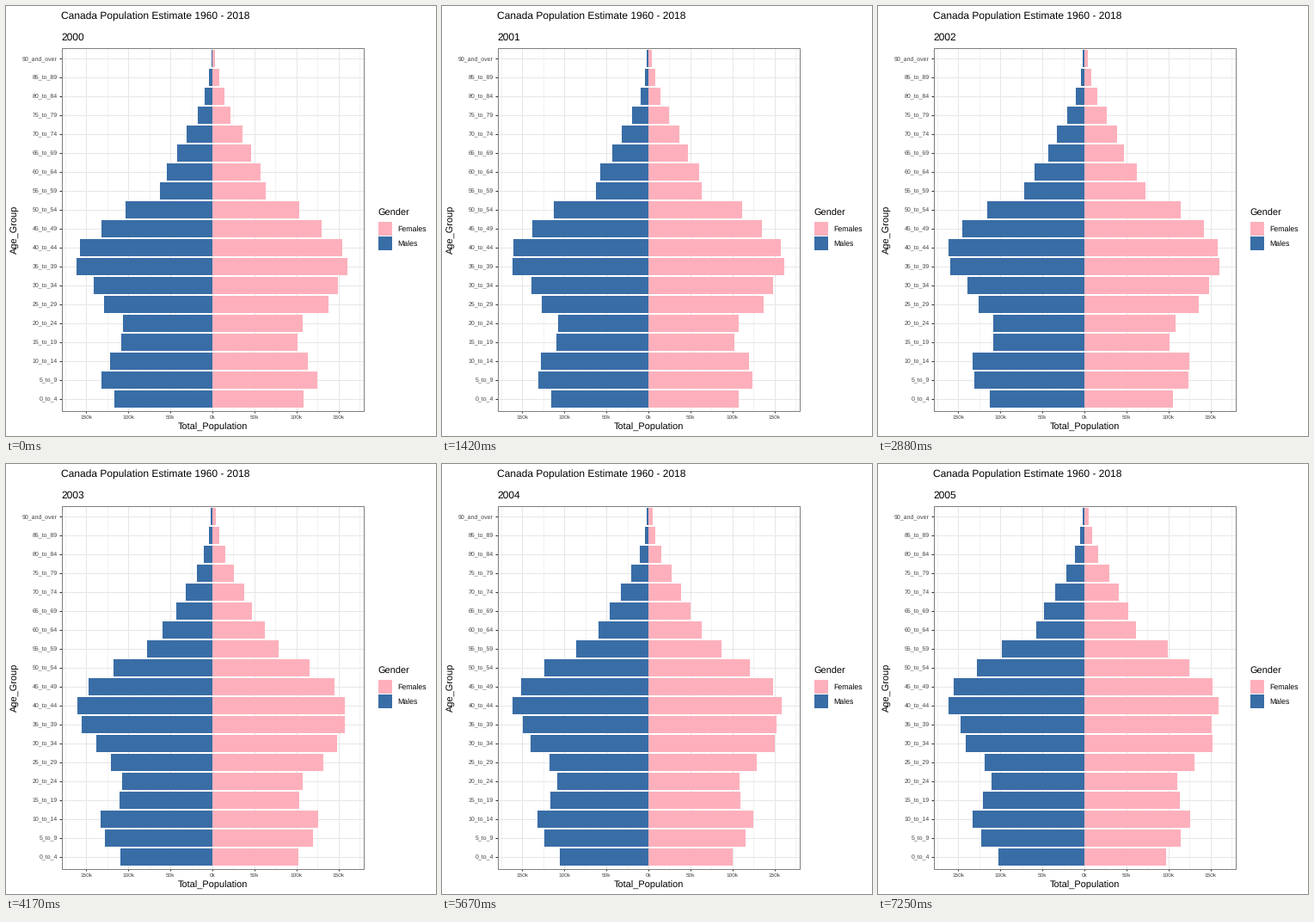
Animation of 500x500 px, one loop 8 s. Source, as a matplotlib script:

```python
import numpy as np
import matplotlib.pyplot as plt
from matplotlib.animation import FuncAnimation

SIZE = 500
LOOP_MS, STEP_MS = 8000, 20
FIRST_YEAR = 2000
FIRST_ARRIVAL, PERIOD, MOVE_MS = 1420, 1457.5, 470

PINK, BLUE = "#FDB0BC", "#396DA6"
GRID, DARK, BORDER, TICK_TEXT = "#E7E7E7", "#333333", "#7F7F7F", "#404040"
LEFT, RIGHT, TOP, BOTTOM = 64.5, 415.5, 48.5, 470.5
ZERO, PX_PER_K = 240, 0.9767
FIRST_ROW, PITCH, BAR_HEIGHT = 457.2, 22, 20

# Age group: male bar lengths by year, in pixels
MALES = {
    "0_to_4": (114, 113, 110, 106, 103, 100),
    "5_to_9": (129, 128, 128, 124, 121, 120),
    "10_to_14": (119, 125, 130, 130, 129, 130),
    "15_to_19": (106, 107, 106, 108.6, 115, 118),
    "20_to_24": (104, 105, 106, 105, 106, 108),
    "25_to_29": (126, 124, 123, 117, 115, 116),
    "30_to_34": (138, 136, 136, 135.3, 137, 138),
    "35_to_39": (158, 158, 156, 151.3, 146, 144),
    "40_to_44": (154, 157, 158, 157, 158, 158),
    "45_to_49": (129, 135, 142, 145, 148, 152),
    "50_to_54": (101, 110, 113, 115.6, 121, 125),
    "55_to_59": (61, 61, 70, 77.4, 85, 96),
    "60_to_64": (53, 56, 58, 58, 58, 56),
    "65_to_69": (41, 42, 42, 42, 45, 47),
    "70_to_74": (30, 31, 32, 31, 32, 34),
    "75_to_79": (17, 19, 20, 17.8, 20, 21),
    "80_to_84": (9, 9, 10, 10, 10, 11),
    "85_to_89": (4, 4, 4, 4, 4, 5),
    "90_and_over": (1.3, 1.6, 1.7, 1.8, 1.9, 2),
}
# Female minus male length in the first and last year; the gap drifts linearly
GAP_FIRST = np.array([-8.3, -7, -8.3, -6.6, 0.6, 9.4, 8.4, -1.4, -3.3, -2.5,
                      -0.5, 1.2, 3.2, 3.8, 5, 4.2, 5, 4, 2])
GAP_LAST = np.array([-5, -8, -6.8, -7.1, 0, 11.6, 11, 3.6, -2.4, -3,
                     -2.8, 0.6, 3.6, 4.3, 6.5, 8, 5.4, 4.3, 3.2])

males = np.array(list(MALES.values())).T
drift = np.linspace(0, 1, len(males))[:, None]
females = males + GAP_FIRST + drift * (GAP_LAST - GAP_FIRST)
rows = FIRST_ROW - PITCH * np.arange(len(MALES))


def pt(px):
    return px * 0.72


plt.rcParams["font.family"] = "Liberation Sans"
plt.rcParams["text.hinting"] = "none"
fig = plt.figure(figsize=(5, 5), dpi=100, facecolor="white")
ax = fig.add_axes([0, 0, 1, 1])
ax.axis("off")


def label(x, y, text, px, color="black", **kw):
    kw.setdefault("va", "baseline")
    return ax.text(x, y, text, fontsize=pt(px), color=color, **kw)


def box(x, y, w, h, **kw):
    ax.add_patch(plt.Rectangle((x, y), w, h, **kw))


# Grid, ticks and tick labels
major = np.arange(-150, 151, 50)
minor = np.arange(-175, 176, 50)
ax.vlines(ZERO + minor * PX_PER_K, TOP, BOTTOM, color=GRID, lw=pt(0.53), zorder=1)
ax.vlines(ZERO + major * PX_PER_K, TOP, BOTTOM, color=GRID, lw=pt(1.07), zorder=1)
ax.hlines(rows, LEFT, RIGHT, color=GRID, lw=pt(1.07), zorder=1)
ax.vlines(ZERO + major * PX_PER_K, BOTTOM, BOTTOM + 2.75, color=DARK, lw=pt(1.07))
ax.hlines(rows, LEFT - 2.75, LEFT, color=DARK, lw=pt(1.07))
for k in major:
    label(ZERO + k * PX_PER_K, 480.4, f"{abs(k)}k", 6.5, TICK_TEXT, ha="center")
for y, group in zip(rows, MALES):
    label(60, y + 2.5, group, 7, TICK_TEXT, ha="right")

# Bars and panel border
male_bars = ax.barh(rows, -males[0], BAR_HEIGHT, left=ZERO, color=BLUE, zorder=2)
female_bars = ax.barh(rows, females[0], BAR_HEIGHT, left=ZERO, color=PINK, zorder=2)
box(LEFT, TOP, RIGHT - LEFT, BOTTOM - TOP, fill=False, ec=BORDER, lw=pt(1), zorder=3)
ax.set_xlim(0, SIZE)
ax.set_ylim(SIZE, 0)

# Titles and legend
label(64.3, 15.2, "Canada Population Estimate 1960 - 2018", 12)
year_text = label(64.3, 40.2, str(FIRST_YEAR), 12)
label(ZERO, 493, "Total_Population", 11, ha="center")
label(10, 259.7, "Age_Group", 11, ha="center", va="center", rotation=90)
label(432.7, 244, "Gender", 11)
for y, name, color in ((251, "Females", PINK), (268, "Males", BLUE)):
    box(433, y, 16, 16, color=color, lw=0)
    label(455.3, y + 11.2, name, 8.8)


def cubic_in_out(p):
    p = np.clip(p, 0, 1)
    return 4 * p**3 if p < 0.5 else 1 - 4 * (1 - p) ** 3


def year_position(t):
    arrivals = FIRST_ARRIVAL + PERIOD * np.arange(len(males) - 1)
    return sum(cubic_in_out(1 + (t - a) / MOVE_MS) for a in arrivals)


def blend(table, pos):
    i = min(int(pos), len(table) - 2)
    return table[i] + (pos - i) * (table[i + 1] - table[i])


def update(frame):
    pos = year_position(frame * STEP_MS)
    for bar, length in zip(male_bars, blend(males, pos)):
        bar.set_width(-length)
    for bar, length in zip(female_bars, blend(females, pos)):
        bar.set_width(length)
    year_text.set_text(str(FIRST_YEAR + int(pos + 0.5)))
    return [*male_bars, *female_bars, year_text]


anim = FuncAnimation(fig, update, frames=LOOP_MS // STEP_MS, interval=STEP_MS,
                     repeat=True, repeat_delay=0)
plt.show()
```
